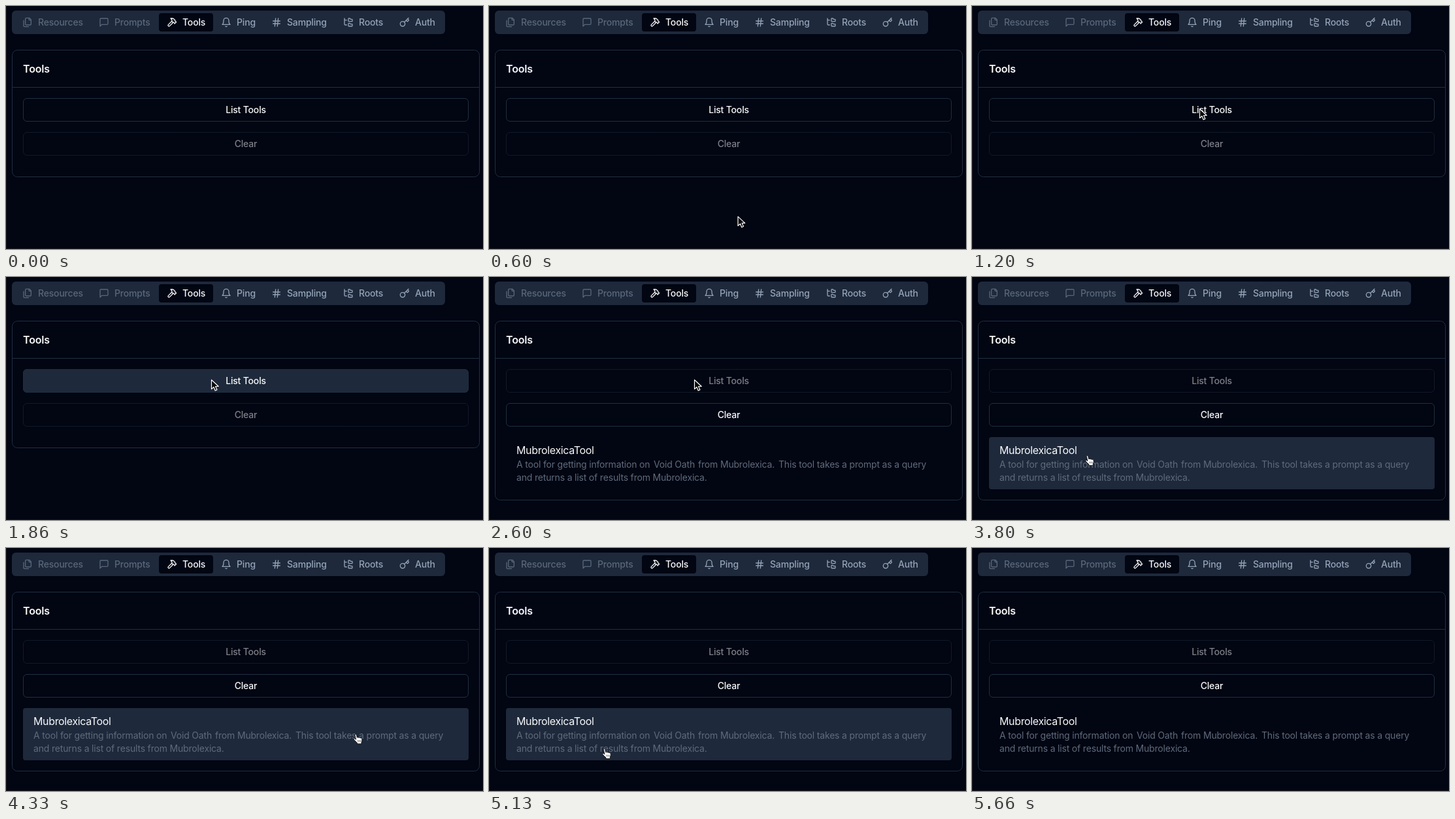
An HTML page for the animation above (6400 ms loop, 730x372 px).

```html
<!DOCTYPE html>
<html lang="en">
<head>
<meta charset="utf-8">
<title>Tools panel</title>
<style>
html, body { margin: 0; width: 100%; height: 100%; overflow: hidden; background: #020512; }
svg { display: block; width: 730px; height: 372px; }
text { font: 500 14px Inter, "Liberation Sans", sans-serif; letter-spacing: -.18px; fill: #f8fafc; white-space: pre; }
.head { font-size: 16px; font-weight: 600; }
.name { font-size: 16px; font-weight: 400; letter-spacing: -.35px; }
.info { font-weight: 400; fill: #5f6b7c; }
.mid { text-anchor: middle; }
.line { fill: none; stroke: #1f2f40; }
.fill { fill: #1e293b; }
.tab { color: #94a3b8; }
.tab text { fill: currentColor; }
.tab path { fill: none; stroke: currentColor; stroke-width: 2; stroke-linecap: round; stroke-linejoin: round; }
.tab.on { color: #f8fafc; }
.tab.off { opacity: .5; }
</style>
</head>
<body>
<svg viewBox="0 0 730 372">
  <path d="M.5 0V371.5H730" fill="none" stroke="#17131a"/>
  <rect class="fill" x="9" y="7" width="663" height="36" rx="6"/>
  <rect x="234" y="11" width="83" height="28" rx="4" fill="#020512"/>
  <g id="tabs"></g>

  <rect id="panel" class="line" x="9.5" y="67.5" width="715" height="194" rx="8"/>
  <path class="line" d="M10 124.5H724"/>
  <text class="head" x="26" y="102">Tools</text>

  <g id="list">
    <rect id="listHover" class="fill" x="26" y="141" width="682" height="36" rx="6"/>
    <rect class="line" x="26.5" y="141.5" width="681" height="35" rx="5.5"/>
    <text class="mid" x="367" y="164">List Tools</text>
  </g>
  <g id="clear">
    <rect class="line" x="26.5" y="193.5" width="681" height="35" rx="5.5"/>
    <text class="mid" x="367" y="216">Clear</text>
  </g>

  <g id="item">
    <rect id="itemHover" class="fill" x="26" y="245" width="682" height="80" rx="4"/>
    <text class="name" x="42" y="271">MubrolexicaTool</text>
    <text class="info" y="292"><tspan x="42">A tool for getting information on </tspan><tspan x="252">Void Oath </tspan><tspan x="320">from Mubrolexica. </tspan><tspan x="443">This tool takes a prompt as a query</tspan></text>
    <text class="info" x="42" y="312">and returns a list of results from Mubrolexica.</text>
  </g>

  <g id="cursor" stroke-linejoin="round">
    <path id="arrow" d="M.5.5V14.6L3.9 11.5 6.2 16.9 8.9 15.7 6.6 10.5H11.2Z" fill="#050505" stroke="#fff" stroke-width="1.2"/>
    <g id="hand">
      <path d="M2.3 1.6C2.3.2 4.4.2 4.7 1.5L5.7 5.9C6.2 5 7.6 5.2 8 6.1 8.6 5.4 10 5.6 10.4 6.6 11.2 6 12.7 6.4 13 7.6 13.6 10 13 11.6 12.3 13V15.4H6V14C4.4 12.6 2.6 10.6 1 9 .2 7.9 1.6 6.9 2.7 7.7L4 8.7Z" fill="#fff" stroke="#111" stroke-width=".9"/>
      <path d="M7 9.6V12.4M9 9.6V12.4M11 9.6V12.4" stroke="#333" stroke-width=".7"/>
    </g>
  </g>
</svg>
<script>
const LOOP = 6400, LISTED = 2130, OVER_ITEM = 3300;
const $ = id => document.getElementById(id);

// label, text x, state, icon on a 24-unit grid
const tabs = [
  ["Resources", 49, "off", "M20 7h-3a2 2 0 0 1-2-2V2M9 18a2 2 0 0 1-2-2V4a2 2 0 0 1 2-2h7l4 4v10a2 2 0 0 1-2 2ZM3 7.6v12.8A1.6 1.6 0 0 0 4.6 22h9.8"],
  ["Prompts", 166, "off", "M21 15a2 2 0 0 1-2 2H7l-4 4V5a2 2 0 0 1 2-2h14a2 2 0 0 1 2 2z"],
  ["Tools", 270, "on", "m15 12-8.4 8.4a1 1 0 1 1-3-3L12 9M18 15l4-4M21.5 11.5l-1.9-1.9A2 2 0 0 1 19 8.2V7l-2.3-2.3A6 6 0 0 0 12.5 3H9l.9.8A6.2 6.2 0 0 1 12 8.4V10l2 2h1.2a2 2 0 0 1 1.4.6l1.9 1.9"],
  ["Ping", 353, "", "M6 8a6 6 0 0 1 12 0c0 7 3 9 3 9H3s3-2 3-9M10.3 21a1.94 1.94 0 0 0 3.4 0"],
  ["Sampling", 430, "", "M4 9h16M4 15h16M10 3 8 21M16 3l-2 18"],
  ["Roots", 540, "", "M20 10a1 1 0 0 0 1-1V6a1 1 0 0 0-1-1h-2.5a1 1 0 0 1-.8-.4l-.9-1.2A1 1 0 0 0 15 3h-2a1 1 0 0 0-1 1v5a1 1 0 0 0 1 1ZM20 21a1 1 0 0 0 1-1v-3a1 1 0 0 0-1-1h-2.9a1 1 0 0 1-.9-.6l-.4-.8a1 1 0 0 0-.9-.6H13a1 1 0 0 0-1 1v5a1 1 0 0 0 1 1ZM3 3v13a2 2 0 0 0 2 2h3M3 5a2 2 0 0 0 2 2h3"],
  ["Auth", 626, "", "m15.5 7.5 2.3 2.3a1 1 0 0 0 1.4 0l2.1-2.1a1 1 0 0 0 0-1.4L19 4M21 2l-9.6 9.6M2 15.5a5.5 5.5 0 1 0 11 0a5.5 5.5 0 1 0-11 0"]
];
$("tabs").innerHTML = tabs.map(([label, x, state, icon]) =>
  `<g class="tab ${state}"><path transform="translate(${x - 24} 17) scale(.6667)" d="${icon}"/><text x="${x}" y="30">${label}</text></g>`
).join("");

// pointer stops: time, x, y
const stops = [
  [300, 392, 380], [1200, 348, 157], [1400, 340, 157], [1860, 314, 157],
  [3200, 314, 157], [3330, 168, 257], [3800, 173, 273], [3860, 174, 275],
  [4530, 628, 287], [4800, 174, 293], [5129, 174, 293], [5130, 173, 307],
  [5330, 173, 307], [5580, 186, 380]
];

const clamp = v => Math.min(1, Math.max(0, v));
const fade = (t, on, off) => clamp((t - on) / 150) - clamp((t - off) / 150);
const show = (id, visible) => $(id).setAttribute("display", visible ? "inline" : "none");

function pointer(t) {
  const i = stops.findIndex(s => s[0] > t);
  if (i < 1) return stops[0].slice(1);
  const [t0, x0, y0] = stops[i - 1], [t1, x1, y1] = stops[i];
  const k = (t - t0) / (t1 - t0), e = k * k * (3 - 2 * k);
  return [x0 + (x1 - x0) * e, y0 + (y1 - y0) * e];
}

function draw(t) {
  const listed = t >= LISTED;
  $("panel").setAttribute("height", listed ? 274 : 194);
  $("list").setAttribute("opacity", listed ? .5 : 1);
  $("clear").setAttribute("opacity", listed ? 1 : .5);
  $("listHover").setAttribute("opacity", fade(t, 1400, LISTED));
  $("itemHover").setAttribute("opacity", fade(t, 3360, 5380));
  show("item", listed);
  show("arrow", t < OVER_ITEM);
  show("hand", t >= OVER_ITEM);
  $("cursor").setAttribute("transform", `translate(${pointer(t)})`);
}

const start = performance.now();
function tick() {
  draw((performance.now() - start) % LOOP);
  requestAnimationFrame(tick);
}
tick();
</script>
</body>
</html>
```
